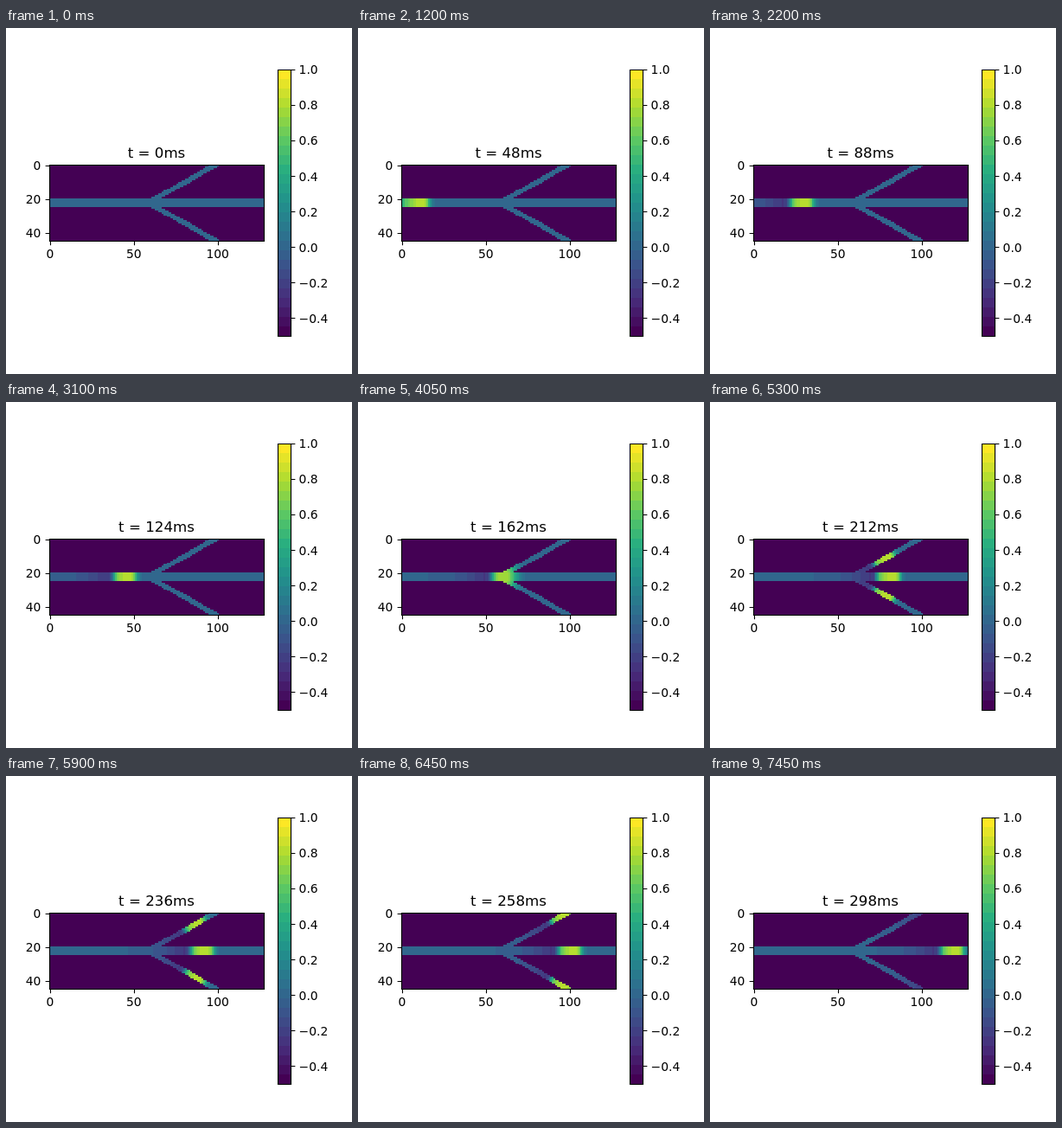
An HTML page with a canvas for the animation above (7500 ms loop, 400x400 px).

```html
<!DOCTYPE html>
<html lang="en">
<head>
<meta charset="utf-8">
<title>Branching pulse</title>
<style>
html, body { margin: 0; width: 100%; height: 100%; overflow: hidden; background: #fff; }
canvas, svg { position: absolute; left: 0; top: 0; width: 400px; height: 400px; }
text { font-family: "DejaVu Sans", sans-serif; font-size: 13.89px; fill: #000; }
#title { font-size: 16.67px; }
path { fill: none; stroke: #000; stroke-width: 1.11; }
</style>
</head>
<body>
<canvas id="field" width="400" height="400"></canvas>
<svg viewBox="0 0 400 400">
  <path id="axes"/>
  <g id="labels"></g>
  <text id="title" x="174" y="150" text-anchor="middle"></text>
</svg>
<script>
const STEP = 50, STEPS = 150, MS_PER_STEP = 2;
const COLS = 128, ROWS = 45, MID = 22, CELL = 1.9375, LEFT = 50, TOP = 158.4;
const V_MIN = -0.5, V_MAX = 1, LEVELS = 28;
const BAR = { x: 314, y: 48, w: 15, h: 308 };

const ctx = document.getElementById('field').getContext('2d');
const title = document.getElementById('title');

const clamp = (v, lo, hi) => Math.min(hi, Math.max(lo, v));
const sigmoid = v => 1 / (1 + Math.exp(-v));

function interpolate(points, t) {
  let i = 1;
  while (i < points.length - 1 && t > points[i][0]) i++;
  const [t0, a] = points[i - 1], [t1, b] = points[i];
  return a + (b - a) * (t - t0) / (t1 - t0);
}

// Viridis, reduced to a fixed number of levels
const stops = ['440154', '472d7b', '3b528b', '2c728e', '21918c', '28ae80', '5ec962', 'addc30', 'fde725']
  .map(hex => [0, 2, 4].map(i => parseInt(hex.slice(i, i + 2), 16)));
const palette = Array.from({ length: LEVELS }, (_, n) => {
  const pos = n / (LEVELS - 1) * (stops.length - 1);
  const i = Math.min(Math.floor(pos), stops.length - 2);
  return `rgb(${stops[i].map((c, k) => Math.round(c + (stops[i + 1][k] - c) * (pos - i)))})`;
});
const colour = v =>
  palette[clamp(Math.floor((v - V_MIN) / (V_MAX - V_MIN) * LEVELS), 0, LEVELS - 1)];

// Conducting cells, each with its path length from the left end
const cells = [];
for (let y = 0; y < ROWS; y++) {
  for (let x = 0; x < COLS; x++) {
    const dy = Math.abs(y - MID);
    const trunk = dy <= 2;
    const branch = x >= 60 && Math.abs(dy - 0.56 * (x - 58.5)) <= 1.75;
    if (!trunk && !branch) continue;
    const s = trunk ? x : 59.8 + (x - 60) * 0.866 + dy * 0.5;
    cells.push({ x, y, s });
  }
}

const frontPath = [[0, -6], [16, 0], [48, 16], [88, 35], [140, 58.5], [162, 67],
  [212, 87], [258, 107], [298, 125]];
const widthPath = [[0, 19], [48, 18], [80, 14], [298, 14]];

function pulseAt(t) {
  const front = interpolate(frontPath, t);
  const back = front - interpolate(widthPath, t);
  const spread = 1.1 + 1.1 * Math.exp(-(((front - 67) / 6) ** 2));
  return s => {
    const plateau = 0.88 - 0.0015 * Math.max(0, front - s) ** 2;
    const tail = -0.28 * Math.exp(-((Math.max(0, back - s) / 17) ** 1.3));
    const excited = sigmoid((s - back) / 0.9);
    return sigmoid((front - s) / spread) * (excited * plateau + (1 - excited) * tail);
  };
}

const edgeX = c => Math.round(LEFT + c * CELL);
const edgeY = r => Math.round(TOP + r * CELL);

function drawField(t) {
  const value = pulseAt(t);
  ctx.fillStyle = palette[0];
  ctx.fillRect(50, 158, 248, 88);
  for (const { x, y, s } of cells) {
    ctx.fillStyle = colour(value(s));
    ctx.fillRect(edgeX(x), edgeY(y), edgeX(x + 1) - edgeX(x), edgeY(y + 1) - edgeY(y));
  }
}

function drawFrame() {
  let d = 'M50.5 158.5H298.5V246.5H50.5ZM314.5 48.5H329.5V356.5H314.5Z';
  let labels = '';
  const snap = v => Math.round(v) + 0.5;
  const label = (text, x, y, anchor) => {
    labels += `<text x="${x}" y="${y}" text-anchor="${anchor}">${text}</text>`;
  };
  for (const n of [0, 50, 100]) {
    const x = LEFT + (n + 0.5) * CELL;
    d += `M${snap(x)} 246.5v4.86`;
    label(n, x, 266, 'middle');
  }
  for (const n of [0, 20, 40]) {
    const y = TOP + (n + 0.5) * CELL;
    d += `M50.5 ${snap(y)}h-4.86`;
    label(n, 40.3, y + 5.1, 'end');
  }
  for (let i = -2; i <= 5; i++) {
    const y = BAR.y + BAR.h * (V_MAX - i / 5) / (V_MAX - V_MIN);
    d += `M329.5 ${snap(y)}h4.86`;
    label((i / 5).toFixed(1).replace('-', '\u2212'), 338.6, y + 5.3, 'start');
  }
  document.getElementById('axes').setAttribute('d', d);
  document.getElementById('labels').innerHTML = labels;

  palette.forEach((fill, i) => {
    const y0 = Math.round(BAR.y + BAR.h * (LEVELS - 1 - i) / LEVELS);
    const y1 = Math.round(BAR.y + BAR.h * (LEVELS - i) / LEVELS);
    ctx.fillStyle = fill;
    ctx.fillRect(BAR.x, y0, BAR.w, y1 - y0);
  });
}

let start = null, shown = -1;
function tick(now) {
  if (start === null) start = now;
  const step = Math.floor(Math.max(0, now - start) / STEP) % STEPS;
  if (step !== shown) {
    shown = step;
    const t = step * MS_PER_STEP;
    drawField(t);
    title.textContent = `t = ${t}ms`;
  }
  requestAnimationFrame(tick);
}

drawFrame();
requestAnimationFrame(tick);
</script>
</body>
</html>
```
